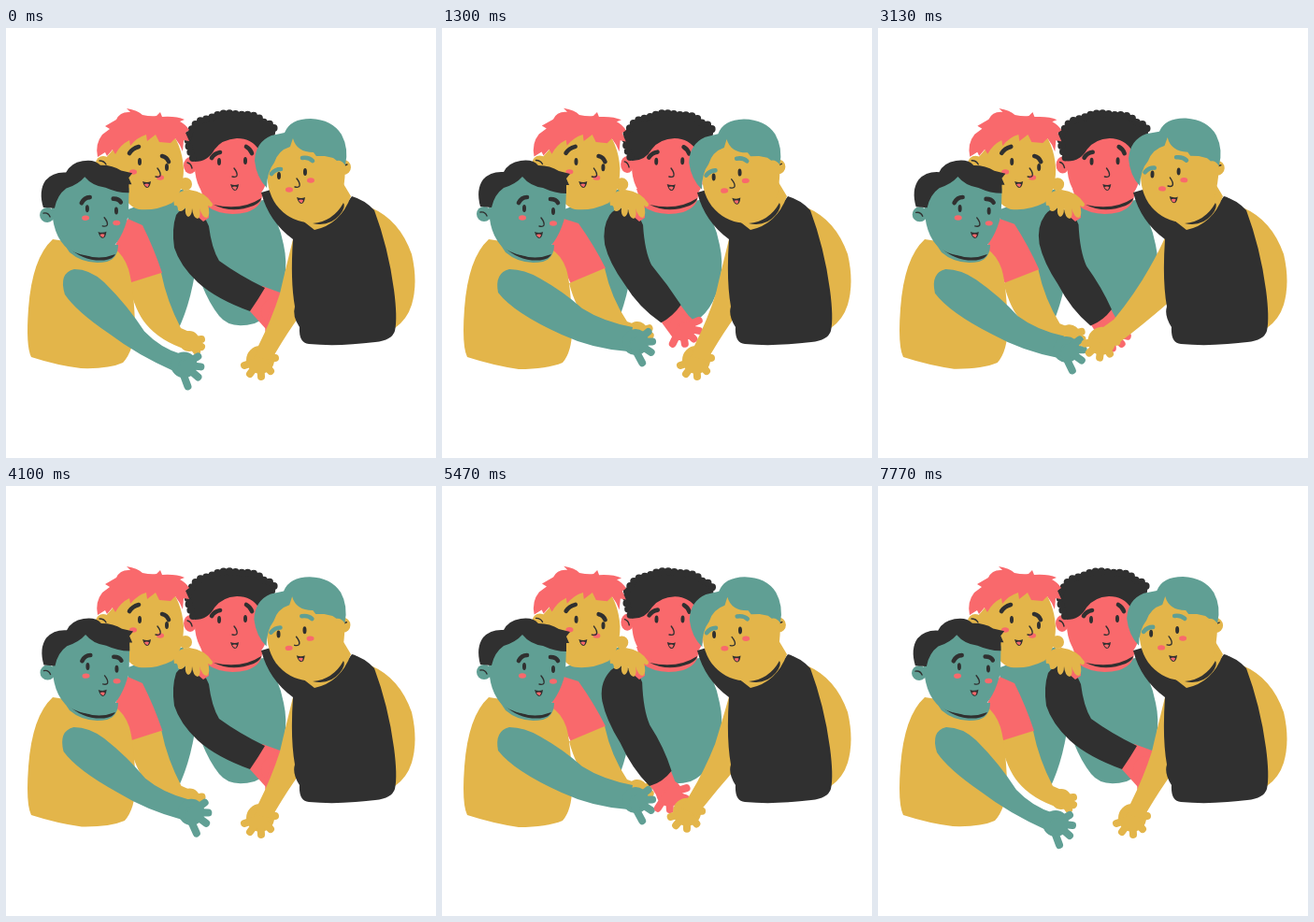
Recreate the animation shown at these times as an HTML page. Size 460x460 px, loop 7.83 s.

```html
<!DOCTYPE html>
<html lang="en">
<head>
<meta charset="utf-8">
<title>Friends joining hands</title>
<style>
html, body { margin: 0; width: 100%; height: 100%; overflow: hidden; background: #fff; }
svg { display: block; width: 100vw; height: 100vh; }
.y { fill: #e3b54a; } .t { fill: #609f94; } .k { fill: #303030; } .p { fill: #f9696c; }
.line { fill: none; stroke: #303030; stroke-width: 1.4; stroke-linecap: round; }
.brow { fill: none; stroke-width: 4.6; stroke-linecap: round; }
.hand { stroke-width: 8; stroke-linecap: round; stroke-linejoin: round; }
.hand.y { stroke: #e3b54a; } .hand.t { stroke: #609f94; } .hand.p { stroke: #f9696c; }
.curls { fill: none; stroke: #303030; stroke-width: 8; stroke-linecap: round; stroke-dasharray: 0 6.5; }
</style>
</head>
<body>
<svg viewBox="0 0 460 460">
  <!-- torsos at the back -->
  <path class="t" d="M128 195L190 172L205 240Q200 290 184 323L150 275Z"/>
  <path class="t" d="M208 192L276 184Q292 205 297 232Q301 250 298 268Q290 306 266 316Q240 323 228 308Q206 280 198 230Z"/>

  <!-- curly hair -->
  <path class="p" d="M208 172L274 176Q275 191 258 197Q232 203 214 190Z"/>
  <path class="k" d="M222 189Q252 196 273 182Q273 186 265 190Q242 199 222 189Z"/>
  <g id="curly">
    <ellipse class="p" cx="197" cy="147" rx="7" ry="9"/>
    <path class="line" d="M194 144Q198 145 199 150"/>
    <path class="p" d="M202 140Q200 170 218 184Q238 193 256 188Q274 181 278 166Q278 145 266 118L222 114Z"/>
    <path class="k" d="M197 134Q190 118 199 108Q204 98 218 97Q232 88 250 93Q268 91 276 101Q289 103 288 113Q284 128 271 131Q263 118 247 118Q231 119 223 130Q216 143 202 143Z"/>
    <path class="curls" d="M200 139Q190 118 199 108Q204 98 218 97Q232 88 250 93Q268 91 276 101Q289 103 287 113"/>
  </g>

  <!-- spiky hair -->
  <g id="spiky">
    <circle class="y" cx="104" cy="145" r="8"/>
    <circle class="y" cx="192" cy="167" r="7"/>
    <path class="line" d="M100 142Q105 142 107 146"/>
    <path class="y" d="M106 140L130 112L172 106Q188 122 190 150Q190 176 178 187Q160 196 142 194Q126 190 122 165Z"/>
    <path class="p" d="M98 138Q95 124 103 114L111 108L106 105L118 98Q122 89 133 90L129 86Q141 88 146 93Q155 95 161 94L165 90L167 95Q182 94 191 98L186 100Q192 103 196 109L192 112L196 121L190 120L189 132Q186 124 181 118L176 123L164 122L160 114L151 121L150 114Q140 117 133 126L132 120Q122 125 117 135L114 130L108 137L106 133Z"/>
  </g>
  <path class="p" id="tee"/>
  <g class="y hand" id="spikyHand"><circle r="7"/><path d="M0 0L13 -2M0 0L13 6M0 0L8 11"/></g>
  <path class="y" id="spikyArm"/>

  <!-- person on the left -->
  <path class="y" id="leftBody"/>
  <path class="t" d="M60 228L120 232Q120 246 108 250Q84 254 68 240Z"/>
  <path class="k" d="M65 233Q92 252 117 242Q115 247 105 248.500Q82 250 65 233Z"/>
  <g id="left">
    <circle class="t" cx="45" cy="199" r="8"/>
    <path class="line" d="M41 197Q46 196 48 201"/>
    <path class="t" d="M50 185Q49 222 67 236Q88 249 109 240Q125 228 132 200L133 172L100 155L62 162Z"/>
    <path class="k" d="M41 191Q36 173 44 162Q52 153 66 154Q71 144 84 142Q97 140 103 147Q116 147 125 153L137 156L133 161L136 168L133 168L133 177Q121 177 108 171Q94 169 86 159Q79 167 66 171Q56 178 53 192Z"/>
  </g>
  <path class="t" id="leftArm"/>
  <g class="t hand" id="leftHand"><circle r="10"/><path d="M0 0L15 -9M0 0L18 2M0 0L15 13M-3 4L4 23"/></g>

  <!-- reaching arm of the curly one -->
  <path class="p" id="curlyWrist"/>
  <g class="p hand" id="curlyHand"><circle r="10"/><path d="M0 0L17 -9M0 0L18 2M0 0L13 11M0 0L4 17M-3 3L-9 18"/></g>
  <path class="k" id="curlyArm"/>

  <!-- hand on the shoulder -->
  <path class="p" d="M200 186L217 190L217 203L211 207L204 201Z"/>
  <path class="y" d="M179 183Q185 173 196 173Q213 175 221 188Q221 193 216 190Q219 199 215 203Q210 203 207 193Q209 202 205 204Q200 203 199 193Q199 201 195 202Q191 200 192 192Q188 198 184 195Q184 189 180 190Z"/>

  <!-- person on the right -->
  <g class="y hand" id="rightHand"><circle r="11"/><path d="M0 0L-17 6M0 0L-11 15M0 0L1 18M0 0L11 12M0 0L16 -2"/></g>
  <path class="y" id="rightArm"/>
  <path class="y" d="M390 192Q421 205 434 242Q441 272 434 296Q429 312 416 321L398 250Z"/>
  <path class="k" d="M273 176L300 168L330 212Q352 206 370 180Q384 184 394 195Q409 235 415 280Q419 310 416 324Q413 334 395 336Q355 341 324 338Q313 337 314 320Q306 308 309 298Q304 270 307 226Q281 207 273 176Z"/>
  <path class="y" d="M312 202L330 216Q358 210 369 180L360 165Z"/>
  <path class="k" d="M328 209Q350 207 361 187Q364 191 357 200Q346 213 328 209Z"/>
  <g id="right">
    <circle class="y" cx="361" cy="149" r="8"/>
    <path class="line" d="M365 146Q360 147 360 152"/>
    <path class="y" d="M280 145Q277 172 289 189Q302 206 322 208Q345 207 355 190Q363 175 363 145L350 122L300 116Z"/>
    <path class="t" d="M266 142Q267 122 284 115L298 112Q304 97 326 97Q349 98 359 114Q367 129 363 147Q359 141 354 142L350 139L341 137L332 137L329 133Q311 133 307 118L304 127Q291 131 287 144Q279 154 279 171Q268 160 266 142Z"/>
  </g>
</svg>
<script>
const $ = id => document.getElementById(id);
const CYCLE = 3915;

// Facial features: eyes, nose and mouth as [x, y], brows as one path
function addFace(id, eyes, nose, mouth, brows, browColor, cheeks) {
  const dot = (cls, rx, ry) => ([x, y]) =>
    `<ellipse class="${cls}" cx="${x}" cy="${y}" rx="${rx}" ry="${ry}"/>`;
  const [nx, ny] = nose, [mx, my] = mouth;
  $(id).insertAdjacentHTML('beforeend',
    cheeks.map(dot('p', 4, 2.7)).join('') + eyes.map(dot('k', 2, 4)).join('') +
    `<path class="brow" stroke="${browColor}" d="${brows}"/>
     <path class="line" d="M${nx} ${ny - 5}q4 5 3 8q-1 2 -5 1"/>
     <path class="k" d="M${mx - 5} ${my - 3}q5 2 9 0q-1 7 -4 7q-3 0 -5 -7z"/>
     <path class="p" d="M${mx - 3} ${my}q3 -1 5 0q-1 4 -2 3q-2 0 -3 -3z"/>`);
}
addFace('curly', [[228, 143], [256, 142]], [244, 155], [245, 170],
  'M220 139Q223 134 229 133M257 127Q261 129 263 134', '#303030', []);
addFace('spiky', [[143, 143], [172, 149]], [162, 155], [151, 167],
  'M132 134Q135 129 142 127M167 137Q172 138 174 143', '#303030', [[136, 154], [165, 160]]);
addFace('left', [[88, 193], [119, 196]], [106, 208], [104, 221],
  'M82 187Q85 181 91 181M116 183Q122 183 124 187', '#303030', [[86, 203], [119, 209]]);
addFace('right', [[292, 158], [320, 154]], [311, 166], [316, 184],
  'M284 156Q288 151 294 151M317 139Q324 138 328 142', '#609f94', [[303, 173], [326, 163]]);

// [reach start, reach end, return start, return end] in ms
const timing = {
  left: [-40, 420, 2850, 3600],
  spiky: [100, 800, 2850, 3600],
  curly: [730, 1680, 2920, 3700],
  right: [1300, 2050, 2980, 3680]
};

// [element, limb, resting outline, reaching outline]; both outlines have the same commands
const shapes = [
  ['tee', 'spiky', 'M130 204L146 211Q158 235 167 262Q150 270 132 274Q126 250 115 237Z',
    'M130 204L146 209Q163 233 175 257Q158 268 138 274Q128 250 115 237Z'],
  ['spikyArm', 'spiky', 'M131 273L166 262Q172 292 187 321L203 328L193 344Q165 335 150 317Q138 303 131 273Z',
    'M136 273L174 257Q181 289 198 314L212 319L207 332Q175 325 155 311Q143 300 136 273Z'],
  ['leftBody', 'left', 'M50 226Q28 246 24 300Q21 340 27 352Q55 361 80 364Q110 365 125 358Q137 345 138 318Q137 280 131 258Q126 243 116 236Z',
    'M50 226Q28 246 24 300Q21 340 27 352Q55 361 82 365Q112 365 129 358Q140 345 139 318Q138 275 133 258Q128 243 116 236Z'],
  ['leftArm', 'left', 'M63 285Q56 262 73 258Q90 258 105 272Q130 297 148 325Q165 343 188 350L180 368Q140 350 110 327Q75 303 63 285Z',
    'M60 283Q56 262 72 258Q88 258 105 268Q130 282 150 300Q172 314 204 320L199 346Q160 343 128 328Q77 305 60 283Z'],
  ['curlyWrist', 'curly', 'M274 276L296 284L278 322L260 302Z', 'M243 305L250 325L232 339L220 320Z'],
  ['curlyArm', 'curly', 'M182 200Q188 191 200 193Q213 200 217 212Q220 236 228 249Q250 265 277 278Q270 290 261 303Q225 290 205 272Q186 254 180 235Q177 215 182 200Z',
    'M178 200Q184 191 196 193Q210 198 214 210Q215 240 222 256Q237 280 244 306Q235 318 220 322Q202 303 190 275Q175 250 171 230Q168 212 178 200Z'],
  ['rightArm', 'right', 'M308 222Q299 258 293 284Q284 312 270 340L267 352L285 356L288 348Q301 326 314 308L320 250Z',
    'M308 222Q301 236 290 253Q274 280 250 308L226 324L238 345L254 335Q280 317 310 292L320 260Z']
];

// [element, limb, resting x y angle, reaching x y angle]
const hands = [
  ['spikyHand', 'spiky', [196, 335, 0], [209, 325, -8]],
  ['leftHand', 'left', [190, 361, 0], [207, 336, -8]],
  ['curlyHand', 'curly', [287, 303, -10], [241, 330, 12]],
  ['rightHand', 'right', [272, 355, 0], [235, 332, 12]]
];

const mix = (a, b, p) => a + (b - a) * p;
const ease = (t, a, b) => {
  const x = Math.min(1, Math.max(0, (t - a) / (b - a)));
  return x * x * (3 - 2 * x);
};
const morph = (from, to, p) => {
  const end = to.match(/\d+/g);
  let i = 0;
  return from.replace(/\d+/g, n => mix(+n, +end[i++], p).toFixed(2));
};
const tilt = (id, angle, x, y) => $(id).setAttribute('transform', `rotate(${angle} ${x} ${y})`);

function draw(now) {
  const t = now % CYCLE, turn = 2 * Math.PI / CYCLE, reach = {};
  for (const [limb, [a, b, c, d]] of Object.entries(timing))
    reach[limb] = ease(t, a, b) - ease(t, c, d);
  for (const [id, limb, from, to] of shapes)
    $(id).setAttribute('d', morph(from, to, reach[limb]));
  for (const [id, limb, from, to] of hands) {
    const [x, y, r] = from.map((v, i) => mix(v, to[i], reach[limb]));
    $(id).setAttribute('transform', `translate(${x} ${y}) rotate(${r})`);
  }
  const sway = 1 - Math.cos(t * turn);
  tilt('curly', 0.9 * sway, 243, 195);
  tilt('spiky', 0.35 * sway, 155, 195);
  tilt('left', -1.2 * (1 - reach.left), 95, 245);
  tilt('right', 1.9 * Math.sin((t - 1950) * turn), 340, 205);
}

const start = performance.now();
function tick() {
  draw(performance.now() - start);
  requestAnimationFrame(tick);
}
tick();
</script>
</body>
</html>
```
